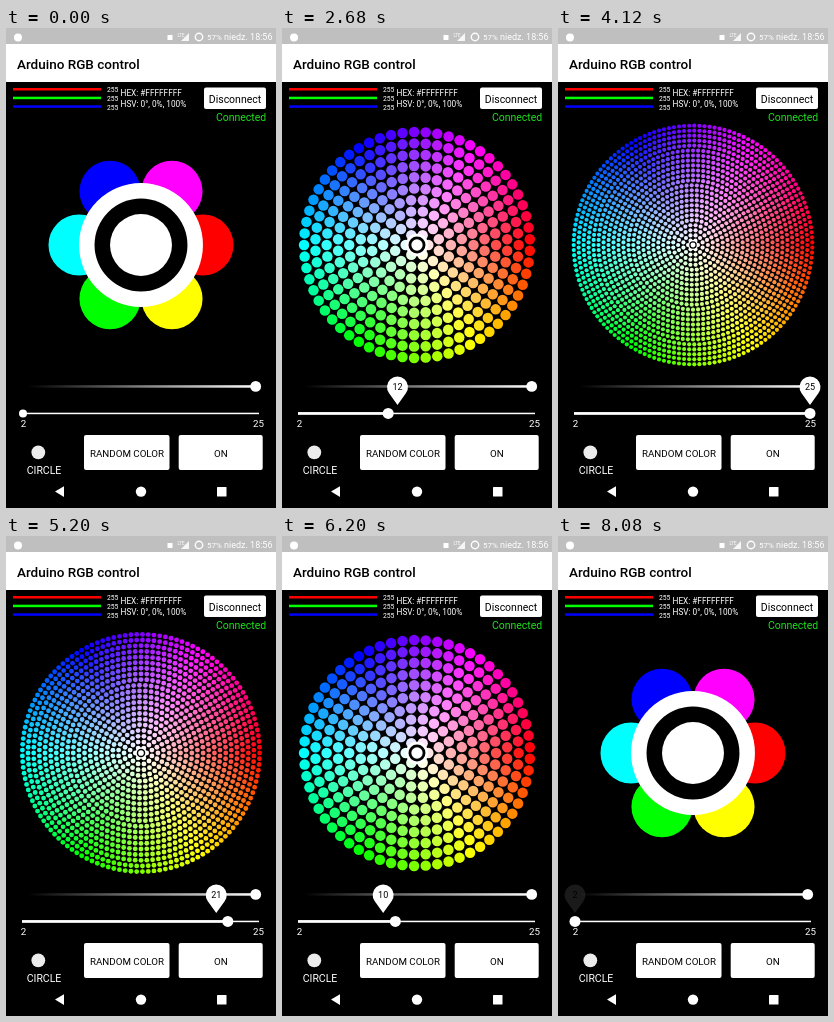
Animation, 270 px wide and 480 px high, one loop 8120 ms. Source, as an HTML page with a canvas:

```html
<!DOCTYPE html>
<html lang="en">
<head>
<meta charset="utf-8">
<title>RGB control</title>
<style>
  html, body { margin: 0; width: 100%; height: 100%; overflow: hidden; background: #000; }
  canvas, svg { position: absolute; left: 0; top: 0; width: 270px; height: 480px; }
  text { font-family: Roboto, sans-serif; font-size: 10.5px; fill: #fff; }
  .small { font-size: 8.25px; }
  .tiny { font-size: 6.75px; }
  .scale { font-size: 9.75px; }
  .mid { text-anchor: middle; }
  .end { text-anchor: end; }
  .dark { fill: #000; }
</style>
</head>
<body>
<canvas id="wheel"></canvas>
<svg viewBox="0 0 270 480" fill="#fff">
  <defs>
    <linearGradient id="fade" gradientUnits="userSpaceOnUse" x1="22" x2="250" y1="0" y2="0">
      <stop stop-color="#000"/><stop offset="1" stop-color="#fff"/>
    </linearGradient>
  </defs>

  <!-- status bar -->
  <rect width="270" height="16" fill="#bfbfbf"/>
  <circle cx="12" cy="9.5" r="4"/>
  <rect x="161.5" y="7" width="5" height="5"/>
  <text x="171.5" y="8.5" style="font-size:4.5px">LTE</text>
  <path d="M183 5V13H175Z" opacity=".85"/>
  <circle cx="193" cy="9" r="3.7" fill="none" stroke="#fff" stroke-width="1.4"/>
  <text x="201" y="12" style="font-size:8px">57%</text>
  <text x="266.5" y="12.3" class="end" style="font-size:9px">niedz. 18:56</text>

  <!-- title bar -->
  <rect y="16" width="270" height="38"/>
  <text x="11" y="40.5" class="dark" style="font-size:13.5px;font-weight:500">Arduino RGB control</text>

  <!-- colour readout -->
  <rect x="7" y="60" width="88" height="2.5" fill="#f00"/>
  <rect x="7" y="68.7" width="88" height="2.5" fill="#0f0"/>
  <rect x="7" y="77.3" width="88" height="2.5" fill="#00f"/>
  <text x="101" y="64" class="tiny">255</text>
  <text x="101" y="73" class="tiny">255</text>
  <text x="101" y="82" class="tiny">255</text>
  <text x="114.5" y="68.3" class="small">HEX: #FFFFFFFF</text>
  <text x="114.5" y="79.2" class="small">HSV: 0°, 0%, 100%</text>
  <rect x="198" y="59.5" width="62" height="21.5" rx="2"/>
  <text x="229" y="75" class="mid dark">Disconnect</text>
  <text x="260.3" y="93.3" class="end" style="fill:#1fe01f">Connected</text>

  <!-- lightness slider -->
  <rect x="22" y="357.2" width="228" height="2.5" fill="url(#fade)"/>
  <circle cx="249.7" cy="358.4" r="5.4"/>

  <!-- density slider -->
  <rect x="16" y="384.7" width="237" height="1.5"/>
  <rect id="filled" x="16" y="384.1" height="2.7"/>
  <circle id="knob" cy="385.4"/>
  <g id="bubble">
    <path d="M0 18L-8.4 6.3A10.5 10.5 0 1 1 8.4 6.3Z"/>
    <text id="label" y="3.3" class="mid dark" style="font-size:9px"></text>
  </g>
  <text x="17.5" y="399" class="mid scale">2</text>
  <text x="252.5" y="399" class="mid scale">25</text>

  <!-- buttons -->
  <circle cx="32.3" cy="424.3" r="6.9" fill="#ececec"/>
  <text x="38" y="445.8" class="mid">CIRCLE</text>
  <rect x="78" y="407" width="85.5" height="35" rx="2"/>
  <text x="121" y="428.5" class="mid dark scale">RANDOM COLOR</text>
  <rect x="172.7" y="407" width="84" height="35" rx="2"/>
  <text x="214.8" y="428.5" class="mid dark scale">ON</text>

  <!-- navigation -->
  <path d="M49 463.6L58 458.3V468.9Z"/>
  <circle cx="135" cy="463.6" r="5.2"/>
  <rect x="211" y="459" width="9.5" height="9.5" rx=".6"/>
</svg>
<script>
const LOOP = 8120, MIN = 2, MAX = 25, LEFT = 17, RIGHT = 252;
const CENTER_X = 135, CENTER_Y = 217, HALF = 124.7, GAP = 0.4;

// [ms, value]
const bubbleX = [[1860, 17], [2000, 34.5], [3400, 201], [3900, 252], [4810, 252], [5720, 154.8], [6720, 43.3], [6960, 17]];
const knobX = [[1880, 17], [2000, 32], [3400, 184.5], [4060, 252], [4880, 252], [5720, 173], [6720, 49], [7040, 17]];
const bubbleAlpha = [[1580, 0], [1700, 1], [7940, 1], [8080, 0.1]];
const knobRadius = [[1580, 4], [1700, 5.5]];

const $ = id => document.getElementById(id);
const wheel = $('wheel'), ctx = wheel.getContext('2d');
const ratio = window.devicePixelRatio || 1;
wheel.width = 270 * ratio;
wheel.height = 480 * ratio;
ctx.scale(ratio, ratio);

function sample(track, t) {
  if (t <= track[0][0]) return track[0][1];
  for (let i = 1; i < track.length; i++) {
    const [t0, a] = track[i - 1], [t1, b] = track[i];
    if (t < t1) return a + (b - a) * (t - t0) / (t1 - t0);
  }
  return track[track.length - 1][1];
}

const toValue = x => Math.round(MIN + (x - LEFT) / (RIGHT - LEFT) * (MAX - MIN));

function hueColor(angle, saturation) {
  const channel = n => {
    const k = (n + angle * 3 / Math.PI) % 6;
    return Math.round(255 * (1 - saturation * Math.max(0, Math.min(k, 4 - k, 1))));
  };
  return `rgb(${channel(5)},${channel(3)},${channel(1)})`;
}

function dot(x, y, radius, color) {
  ctx.fillStyle = color;
  ctx.beginPath();
  ctx.arc(x, y, radius, 0, Math.PI * 2);
  ctx.fill();
}

function drawWheel(density) {
  const maxRadius = HALF - GAP - HALF / density;
  const size = maxRadius / (density - 1) / 2;
  ctx.clearRect(0, 0, 270, 480);
  for (let ring = 1; ring < density; ring++) {
    const saturation = ring / (density - 1), radius = maxRadius * saturation;
    const total = Math.floor(0.975 * Math.PI / Math.asin(size / radius) + 0.5);
    const shift = ring % 2 ? 0 : 0.5;
    for (let j = 0; j < total; j++) {
      const angle = Math.PI * 2 * (j + shift) / total;
      dot(CENTER_X + radius * Math.cos(angle), CENTER_Y + radius * Math.sin(angle),
        size - GAP, hueColor(angle, saturation));
    }
  }
  dot(CENTER_X, CENTER_Y, size * 2, '#fff');
  dot(CENTER_X, CENTER_Y, size * 1.5, '#000');
  dot(CENTER_X, CENTER_Y, size, '#fff');
}

let shownDensity;
function render(now) {
  const t = now % LOOP;
  const x = sample(knobX, t), tip = sample(bubbleX, t);
  $('knob').setAttribute('cx', x);
  $('knob').setAttribute('r', sample(knobRadius, t));
  $('filled').setAttribute('width', x - 16);
  $('bubble').setAttribute('transform', `translate(${tip} 359)`);
  $('bubble').setAttribute('opacity', sample(bubbleAlpha, t));
  $('label').textContent = toValue(tip);

  const density = toValue(x);
  if (density !== shownDensity) drawWheel(shownDensity = density);
}

const start = performance.now();
function tick() {
  render(performance.now() - start);
  requestAnimationFrame(tick);
}
tick();
</script>
</body>
</html>
```
